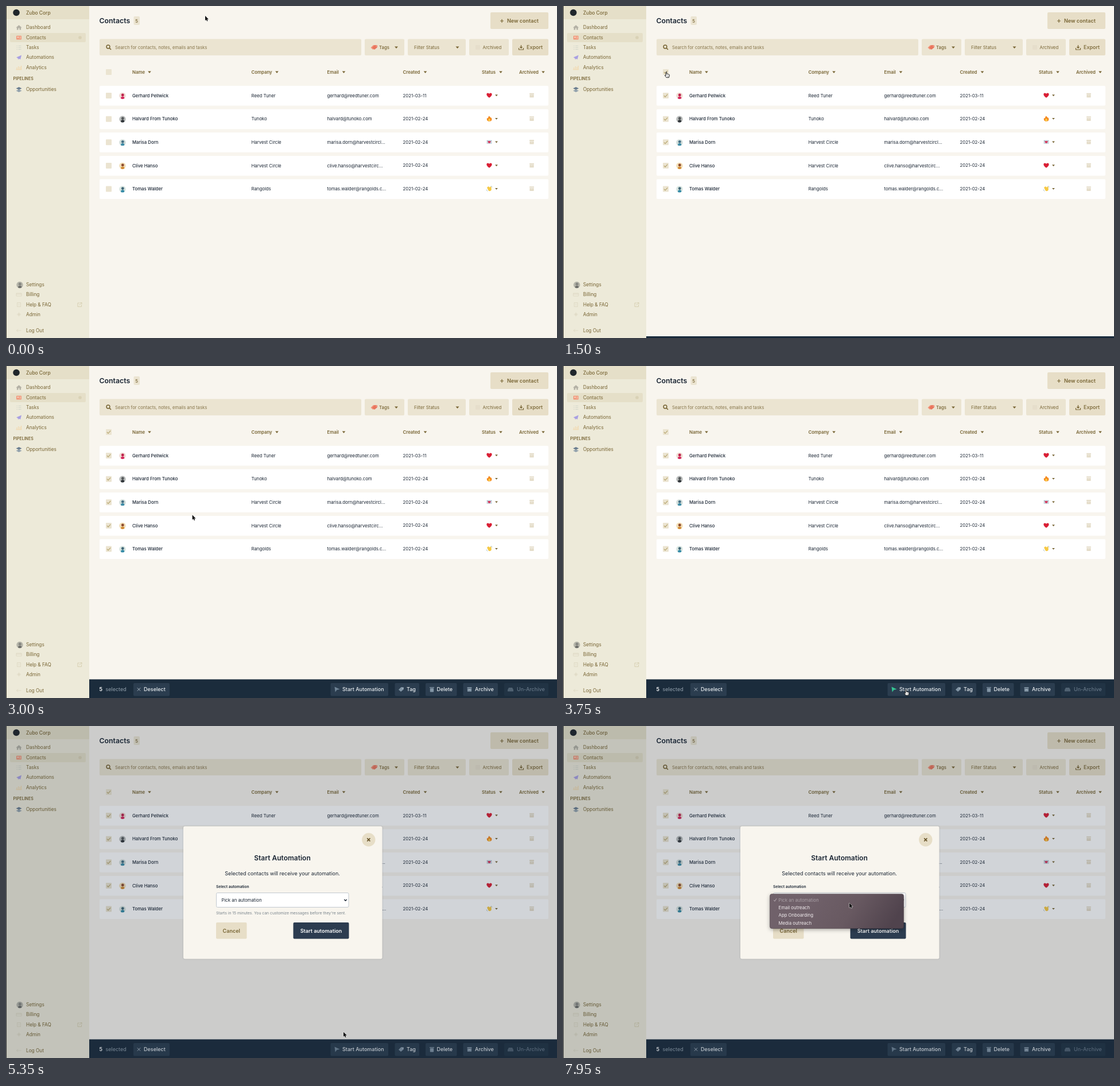
Animation, 960 px wide and 578 px high, one loop 8000 ms. Source, as an HTML page with a canvas:

```html
<!DOCTYPE html>
<html lang="en">
<head>
<meta charset="utf-8">
<title>Contacts</title>
<style>
html, body { margin: 0; width: 100%; height: 100%; overflow: hidden; background: #f8f5ee; }
canvas { display: block; }
</style>
</head>
<body>
<canvas id="stage" width="960" height="578"></canvas>
<script>
const ctx = document.getElementById('stage').getContext('2d');
const LOOP = 8000, STEP = 50;
const NAVY = '#1b2c3c', BROWN = '#786534', INK = '#1a2533', SAND = '#ebe4d1', DEEP = '#e7dec7', TAN = '#b9a873';

function box(x, y, w, h, r, fill, stroke) {
  ctx.beginPath();
  ctx.roundRect(x, y, w, h, r);
  if (fill) { ctx.fillStyle = fill; ctx.fill(); }
  if (stroke) { ctx.strokeStyle = stroke; ctx.lineWidth = 1; ctx.stroke(); }
}

function dot(x, y, r, fill) {
  ctx.beginPath();
  ctx.arc(x, y, r, 0, 7);
  ctx.fillStyle = fill;
  ctx.fill();
}

// y is the middle of the capitals
function text(str, x, y, size, color, weight = 400, align = 'left') {
  ctx.font = `${weight} ${size}px Inter, sans-serif`;
  ctx.textAlign = align;
  ctx.fillStyle = color;
  ctx.fillText(str, x, y + size * 0.36);
}

function shape(d, x, y, fill, stroke, width = 1) {
  const path = new Path2D(d);
  ctx.save();
  ctx.translate(x, y);
  if (fill) { ctx.fillStyle = fill; ctx.fill(path); }
  if (stroke) { ctx.strokeStyle = stroke; ctx.lineWidth = width; ctx.stroke(path); }
  ctx.restore();
}

const caret = (x, y, s = 3, color = BROWN) =>
  shape(`M${-s} ${-s / 2}H${s}L0 ${s / 2 + 0.5}Z`, x, y, color);

const plane = (x, y, color) => shape('M4.5-4L-4.5 0-2 1.2-1 4 0 2.3 2.6 3.6Z', x, y, color);

function tag(x, y, color) {
  shape('M4.5-3.5L4.3 0-.5 4-4.5.5 0-4Z', x, y, color);
  dot(x + 2.8, y - 2, 0.8, 'rgba(255,255,255,.6)');
}

function archive(x, y, color) {
  box(x - 4, y - 3.8, 8, 2, 0.5, color);
  box(x - 3.6, y - 1.2, 7.2, 5, 0.5, color);
  shape('M-1.3 0H1.3', x, y + 0.5, null, 'rgba(255,255,255,.5)', 0.8);
}

function checkbox(x, y, checked) {
  box(x - 5, y - 5, 10, 10, 1, SAND);
  if (checked) shape('M-3 0L-1 2.3 3.2-2.3', x, y, null, TAN, 1.2);
}

function avatar(x, y, back, body, head = body) {
  ctx.save();
  ctx.beginPath();
  ctx.arc(x, y, 5.7, 0, 7);
  ctx.clip();
  ctx.fillStyle = back;
  ctx.fillRect(x - 6, y - 6, 12, 12);
  dot(x + 0.3, y - 1.3, 2.4, head);
  box(x - 2.8, y + 1.4, 6, 6, 2.5, body);
  ctx.restore();
}

const statusIcons = {
  heart: (x, y) => shape('M0 4.3C-8-.8-4-6.4 0-2.8 4-6.4 8-.8 0 4.3Z', x, y, '#d91f35'),
  fire(x, y) {
    shape('M-.5-4.8C1-3 2.5-2.6 2.9-1L3.6-2C6 3.5 2.5 4.6 0 4.6-4 4.6-5 1-3.6-1.5L-2.5-.5C-2-2-1.5-3-.5-4.8Z', x, y, '#f58a1f');
    shape('M0-.5C3 2 2 4.3 0 4.3-2.5 4.3-2.5 2 0-.5Z', x, y, '#fbd04f');
  },
  letter(x, y) {
    box(x - 4.5, y - 3.2, 9, 6.4, 0.8, '#c9d6df');
    shape('M-4-2.8L0 1 4-2.8', x, y, null, '#93a6b4', 0.8);
    shape('M0 2.3C-4.2 0-2.3-3 0-1.5 2.3-3 4.2 0 0 2.3Z', x, y, '#d6385c');
  },
  wave(x, y) {
    shape('M-4-2.2L-1.5-4 1-2 1.8-4.2 3.4-3.4 3.8 1.5C3 5 0 4.5-1.5 3.2Z', x, y, '#f6c945');
    shape('M3-4.8Q4.8-4 4.8-2.3M-4.8 1.5Q-4.5 3.6-2.8 4.4', x, y, null, '#91aeba', 0.8);
  }
};

const nav = [
  ['Dashboard', 37.5, (x, y) => shape('M-5 0L0-4.2 5 0 3.6.2V4H1V1H-1V4H-3.6V.2Z', x, y, '#b4b1a5')],
  ['Contacts', 55, (x, y) => {
    box(x - 4.5, y - 3.2, 9, 6.6, 1, '#f09a7e');
    dot(x - 1.6, y - 0.6, 1.2, '#fbe0cd');
    shape('M1-1H3.5M1 1H3.5', x, y, null, '#fbe0cd', 0.8);
  }],
  ['Tasks', 72.5, (x, y) => shape('M-4-3H-2.6M-4 0H-2.6M-4 3H-2.6M-1-3H4M-1 0H4M-1 3H4', x, y, null, '#d3d6ca')],
  ['Automations', 89.5, (x, y) => plane(x, y, '#a9a0e2')],
  ['Analytics', 107, (x, y) => shape('M-3.5 3V0M-.8 3V-2M1.8 3V-1M4 3V-3M-5 3.7H5', x, y, null, '#f2d7aa', 1.1)],
  ['Opportunities', 145.5, (x, y) => {
    shape('M0 0L5 2 0 4.4-5 2Z', x, y, '#8f9fab');
    shape('M0-4.4L5-2 0 .6-5-2Z', x, y, '#6b7e90');
  }]
];

const footer = [
  ['Settings', 485.5],
  ['Billing', 502.5, 'M-4.5-2.5H4.5V2.5H-4.5ZM-4.5-.8H4.5'],
  ['Help & FAQ', 520, 'M-3-3.5H3V3.5H-3ZM-1-1H1M-1 1H1'],
  ['Admin', 537, 'M0-3.5V3.5M-3.5 0H3.5M-2-2L2 2M2-2L-2 2'],
  ['Log Out', 565, 'M4 0H-4L-1.5-2.5M-4 0L-1.5 2.5']
];

const people = [
  ['Gerhard Pellwick', 'Reed Tuner', 'gerhard@reedtuner.com', '2021-03-11', 'heart', ['#f0dcd3', '#d5265c', '#bd214c']],
  ['Halvard From Tunoko', 'Tunoko', 'halvard@tunoko.com', '2021-02-24', 'fire', ['#b9bcbb', '#2f3438', '#54585a']],
  ['Marisa Dorn', 'Harvest Circle', 'marisa.dorn@harvestcircl...', '2021-02-24', 'letter', ['#d3dedb', '#3d8ca7', '#456f83']],
  ['Clive Hanso', 'Harvest Circle', 'clive.hanso@harvestcirc...', '2021-02-24', 'heart', ['#f3dfb7', '#d28b33', '#8c4a2e']],
  ['Tomas Walder', 'Rangolds', 'tomas.walder@rangolds.c...', '2021-02-24', 'wave', ['#d8e5e0', '#3289a5', '#3f6576']]
];

function drawSidebar() {
  box(0, 0, 145, 578, 0, '#edead9');
  box(0, 0, 145, 23, 0, '#e5dfc8');
  box(7, 47, 132, 16, 2, '#e5dfc8');
  dot(18, 11.5, 5.8, '#20262b');
  text('Zubo Corp', 35, 11.5, 8.4, BROWN, 500);
  for (const [label, y, icon] of nav) {
    icon(22.5, y);
    text(label, 35, y, 8.25, BROWN);
  }
  dot(129, 55, 2.8, '#d9d2b6');
  text('PIPELINES', 12.5, 126.5, 7, BROWN, 600);
  for (const [label, y, icon] of footer) {
    if (icon) shape(icon, 22.5, y, null, '#dcd6c1', 0.8);
    else avatar(24, y, '#b5b4a9', '#6d6e69', '#858680');
    text(label, 35, y, 8.25, BROWN);
  }
  shape('M0-3H-3.5V3.5H3V0M-1 1L3.5-3.5M.8-3.5H3.5V-.8', 128.5, 520, null, '#d2c9a8', 0.8);
  box(0, 0, 1, 578, 0, '#35352f');
}

function drawToolbar() {
  text('Contacts', 162.5, 26, 12.3, INK, 600);
  box(222.5, 18, 10.5, 15, 2, SAND);
  text('5', 227.7, 26, 7.8, BROWN, 500, 'center');
  box(844, 11, 101, 29, 2, DEEP);
  shape('M-3 0H3M0-3V3', 864, 26, null, BROWN, 1.2);
  text('New contact', 873, 26, 9, BROWN, 600);

  for (const [x, w] of [[163, 456], [625, 69], [700, 101], [807, 69]]) box(x, 57.5, w, 28.5, 2, SAND);
  box(882, 57.5, 63, 28.5, 2, DEEP);
  ctx.beginPath();
  ctx.arc(178, 71, 2.9, 0, 7);
  ctx.strokeStyle = BROWN;
  ctx.lineWidth = 1.5;
  ctx.stroke();
  shape('M0 0L3 3', 180, 73, null, BROWN, 1.7);
  text('Search for contacts, notes, emails and tasks', 190, 72, 7.68, '#86754a');
  tag(640, 72, '#f0937a');
  tag(642.5, 72, '#e9755c');
  text('Tags', 650, 72, 7.8, BROWN, 500);
  caret(680, 72);
  text('Filter Status', 711, 72, 7.85, BROWN);
  caret(786.5, 72);
  box(818, 68, 8, 8, 1, '#e6decb');
  text('Archived', 830.5, 72, 7.8, BROWN);
  shape('M0-4V1M-2-1L0 1.3 2-1M-4 1V4H4V1', 897.5, 72, null, BROWN, 1.2);
  text('Export', 907, 72, 9, BROWN, 500);
}

function drawTable(checked) {
  checkbox(179, 115, checked);
  const heads = [['Name', 220, 250], ['Company', 427.5, 472], ['Email', 559.5, 588.5], ['Created', 691.5, 730.5], ['Status', 829, 862], ['Archived', 894, 936]];
  for (const [label, x, arrow] of heads) {
    text(label, x, 115, 7.8, BROWN, 600);
    caret(arrow, 115, 2.8);
  }
  people.forEach(([name, company, email, date, status, tones], i) => {
    const y = 156 + i * 40.65;
    box(163, y - 17, 782, 34.5, 2, '#fff');
    checkbox(179, y, checked);
    avatar(203, y + 0.3, ...tones);
    text(name, 220, y, 7.8, INK, 500);
    text(company, 427.5, y, 7.8, INK);
    text(email, 559.5, y, 7.8, INK);
    text(date, 691.5, y - 0.3, 7.8, INK);
    statusIcons[status](842, y - 0.5);
    caret(854.5, y - 0.5, 2.4);
    archive(916, y - 0.5, '#e4dcc8');
  });
}

function drawBar(top, hover) {
  if (top >= 578) return;
  ctx.save();
  ctx.translate(0, top);
  box(145, 0, 815, 34, 0, NAVY);
  text('5', 162.5, 17.5, 9, '#fff', 600);
  text('selected', 173.5, 17.5, 9, '#93a1ad');
  const pale = '#8295a5';
  const buttons = [
    ['Deselect', 222, 63, 240, (x, y) => shape('M-2.7-2.7L2.7 2.7M2.7-2.7L-2.7 2.7', x, y, null, '#aebbc6', 1)],
    ['Start Automation', 565.5, 100.5, 586, (x, y) => shape('M-4-4.5L5-.2-.2 1-2.8 4.8Z', x, y, hover ? '#35c694' : '#708597')],
    ['Tag', 677.5, 42.5, 698, (x, y) => tag(x, y, pale)],
    ['Delete', 731, 54.5, 750.5, (x, y) => {
      box(x - 4, y - 4, 8, 1.3, 0, pale);
      box(x - 3.2, y - 2, 6.4, 6.5, 0.8, pale);
    }],
    ['Archive', 796.5, 60.5, 817, (x, y) => archive(x, y, pale)],
    ['Un-Archive', 868, 77, 890, (x, y) => shape('M-3-3H3L5 .5V3.5H-5V.5Z', x, y, '#506272')]
  ];
  buttons.forEach(([label, x, w, textX, icon], i) => {
    const dim = i === 5;
    box(x, 6.5, w, 22.5, 2, dim ? '#213344' : '#2b3d4f');
    icon(i ? x + 11 : x + 9.5, 17.5);
    text(label, textX, 17.5, 9, dim ? '#657686' : '#e9eef1', 500);
  });
  ctx.restore();
}

function drawModal() {
  box(0, 0, 960, 578, 0, 'rgba(27,44,60,.2)');
  ctx.save();
  ctx.shadowColor = 'rgba(0,0,0,.16)';
  ctx.shadowBlur = 3;
  box(309, 174.5, 346.5, 231, 3, '#f8f5ee');
  ctx.restore();
  dot(631.8, 198, 11.7, DEEP);
  shape('M-2.6-2.6L2.6 2.6M2.6-2.6L-2.6 2.6', 631.8, 198, null, '#665328', 1.6);
  text('Start Automation', 481.5, 230, 12, INK, 600, 'center');
  text('Selected contacts will receive your automation.', 481.5, 256.5, 9, INK, 400, 'center');
  text('Select automation', 366, 280, 6.6, INK, 600);
  box(366.5, 290.5, 230.5, 25, 2, '#fff', '#c2c9cf');
  text('Pick an automation', 375.5, 303, 7.8, INK);
  shape('M-2.2-1.1L0 1.2 2.2-1.1', 591.5, 303, null, INK, 1.4);
  text("Starts in 15 minutes. You can customize messages before they're sent.", 366, 326, 6.8, '#78838b');
  box(366, 342, 53.5, 28.5, 2, DEEP);
  text('Cancel', 392.7, 356.5, 9, BROWN, 600, 'center');
  box(500.5, 342, 97, 28.5, 2, '#2c3c50');
  text('Start automation', 549, 356.3, 9, '#fff', 600, 'center');
}

function drawMenu() {
  const fill = ctx.createLinearGradient(440, 285, 560, 365);
  fill.addColorStop(0, '#70616a');
  fill.addColorStop(0.5, '#685961');
  fill.addColorStop(1, '#50434d');
  ctx.save();
  ctx.shadowColor = 'rgba(0,0,0,.35)';
  ctx.shadowBlur = 7;
  ctx.shadowOffsetY = 2;
  box(360.5, 292.5, 233, 60, 3.5, fill);
  ctx.restore();
  box(360.5, 292.5, 233, 60, 3.5, null, 'rgba(60,48,55,.45)');
  shape('M-2.2 0L-.6 2.2 2.5-2.7', 369.5, 303, null, '#b9afb5', 1);
  ['Pick an automation', 'Email outreach', 'App Onboarding', 'Media outreach'].forEach((label, i) =>
    text(label, 375.5, 303 + i * 13.3, 7.8, i ? '#f2edef' : '#aaa0a6'));
}

// time, x, y of the pointer tip
const track = [
  [0, 347, 17], [250, 346, 18], [1100, 180, 114], [2670, 180.5, 114.5], [3500, 594, 530],
  [3750, 597.5, 563], [3800, 597.5, 563], [3850, 596.5, 563], [5050, 596.5, 563], [5100, 596, 552],
  [5200, 596, 552], [6050, 498, 317], [6400, 500, 308], [7900, 500, 308], [7950, 499, 308], [LOOP, 499, 308]
];

const smooth = p => p * p * (3 - 2 * p);

function pointerAt(t) {
  const i = track.findIndex(k => k[0] > t);
  const [t0, x0, y0] = track[i - 1], [t1, x1, y1] = track[i];
  const p = smooth((t - t0) / (t1 - t0));
  return [x0 + (x1 - x0) * p, y0 + (y1 - y0) * p];
}

function drawPointer(x, y, hand) {
  ctx.lineJoin = 'round';
  if (hand) {
    shape('M-.8 1Q0-.2.8 1V4.2L4.6 5Q5.6 5.4 5.3 7L4.4 10.5H0L-2.8 6.8Q-2.4 5.5-.8 7Z', x, y, '#fff', '#111', 0.9);
    shape('M1.6 7V9M3.2 7V9', x, y, null, '#333', 0.5);
  } else {
    const arrow = 'M0 0V8.4L1.9 6.7 3.2 9.6 4.6 9 3.4 6.2H6Z';
    shape(arrow, x, y, null, '#fff', 0.9);
    shape(arrow, x, y, '#111');
  }
}

function barTop(t) {
  if (t < 1500) return 578;
  const p = Math.min(1, Math.max(0, (t - 1650) / 300));
  return 575 - 29.5 * (1 - (1 - p) ** 2);
}

function draw(now) {
  const t = Math.floor((now % LOOP) / STEP) * STEP;
  const [x, y] = pointerAt(t);
  const modal = t >= 3850;
  const onButton = !modal && y > 552 && x > 565 && x < 666;
  const onCheckbox = Math.abs(x - 179) < 6 && Math.abs(y - 115) < 6;
  const onRow = !modal && y > 139 && y < 336 && (y - 139) % 40.65 < 34.5;

  box(0, 0, 960, 578, 0, '#f8f5ee');
  drawSidebar();
  drawToolbar();
  drawTable(t >= 1500);
  drawBar(barTop(t), onButton);
  if (modal) drawModal();
  if (t >= 6850) drawMenu();
  drawPointer(x, y, onButton || onCheckbox || onRow);
}

const start = performance.now();
(function tick() {
  draw(performance.now() - start);
  requestAnimationFrame(tick);
})();
</script>
</body>
</html>
```
